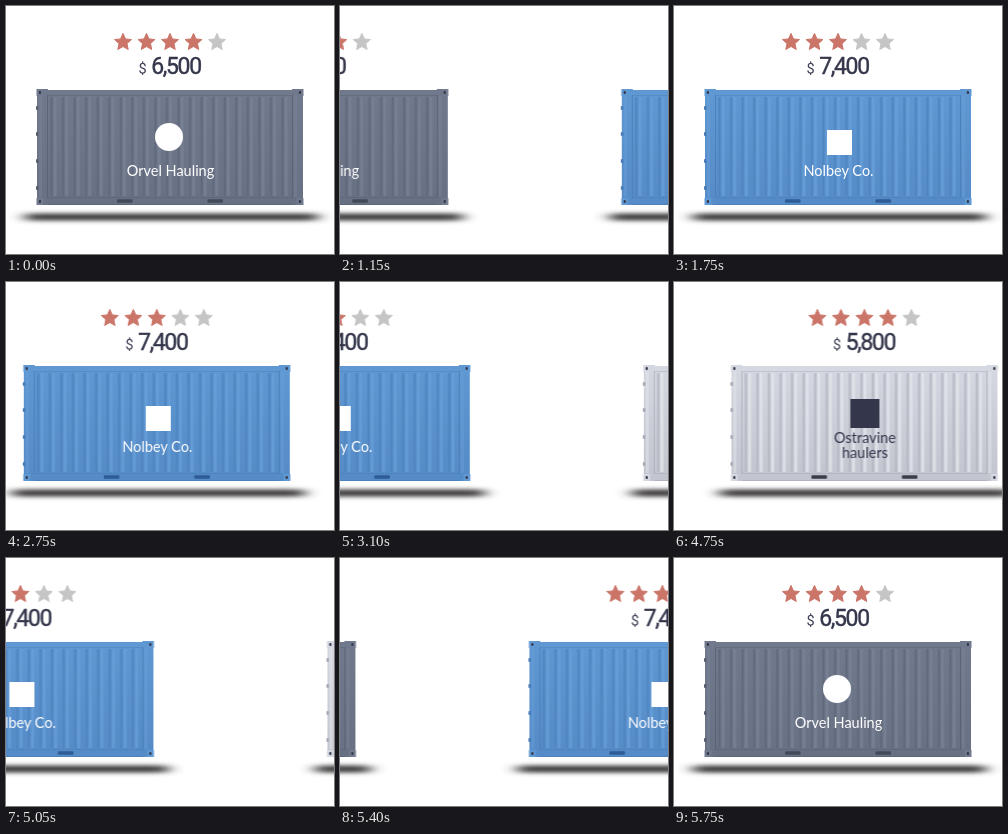
Animation, 328 px wide and 248 px high, one loop 6 s. Source, as an HTML page:

```html
<!DOCTYPE html>
<html lang="en">
<head>
<meta charset="utf-8">
<title>Container quotes</title>
<style>
  html, body { margin: 0; width: 100%; height: 100%; overflow: hidden; background: #fff; }
  svg { display: block; width: 328px; height: 248px; }
  text { text-anchor: middle; }
  .price { font: 400 23px Roboto, Arial, sans-serif; letter-spacing: -1.3px; fill: #34364b; stroke: #34364b; stroke-width: .4px; }
  .unit { font: 400 14.5px Roboto, Arial, sans-serif; fill: #3d3f54; }
  .name { font: 400 14.5px Lato, sans-serif; }
</style>
</head>
<body>
<svg viewBox="0 0 328 248">
  <defs>
    <filter id="blur" filterUnits="userSpaceOnUse" x="-20" y="194" width="370" height="36">
      <feGaussianBlur stdDeviation="8 2"/>
    </filter>
  </defs>
  <g id="track"></g>
</svg>
<script>
const LOOP = 6000, STEP = 50, GAP = 440;
// start time, scroll from, scroll to; each move is linear and lasts one second
const MOVES = [[720, 0, GAP], [2720, GAP, 2 * GAP], [4720, 2 * GAP, 0]];

const THEMES = [
  { id: 'slate', top: '#717a8d', low: '#687083', dark: '#5c6477', light: '#7a8396', edge: '#565d70', pocket: '#434959',
    ink: '#fff', stars: 4, price: '6,500', lines: ['Orvel Hauling'], base: [169.5],
    mark: '<circle cx="163" cy="131" r="14" fill="#fff"/>' },
  { id: 'blue', top: '#5f98d3', low: '#558bc7', dark: '#4b80bc', light: '#68a0da', edge: '#467bb4', pocket: '#2d5c96',
    ink: '#fff', stars: 3, price: '7,400', lines: ['Nolbey Co.'], base: [170],
    mark: '<rect x="153" y="124" width="25" height="25" fill="#fff"/>' },
  { id: 'white', top: '#d5d8e0', low: '#c2c5ce', dark: '#adb1be', light: '#e6e8ee', edge: '#a4a8b4', pocket: '#3a3d48',
    ink: '#34364b', stars: 4, price: '5,800', lines: ['Ostravine', 'haulers'], base: [161, 175.5],
    mark: '<rect x="150" y="117" width="29" height="29" fill="#34364b"/>' }
];

const rect = (x, y, w, h, fill, extra = '') =>
  `<rect x="${x}" y="${y}" width="${w}" height="${h}" fill="${fill}" ${extra}/>`;

const text = (x, y, cls, str, fill) =>
  `<text x="${x}" y="${y}" class="${cls}"${fill ? ` fill="${fill}"` : ''}>${str}</text>`;

const repeat = (n, fn) => Array.from({ length: n }, (_, i) => fn(i)).join('');

function star(cx, cy, fill) {
  const pts = Array.from({ length: 10 }, (_, i) => {
    const a = (i / 5 - .5) * Math.PI, r = i % 2 ? 4.2 : 8.9;
    return `${(cx + r * Math.cos(a)).toFixed(2)},${(cy + r * Math.sin(a)).toFixed(2)}`;
  });
  return `<polygon points="${pts.join(' ')}" fill="${fill}" stroke="${fill}" stroke-linejoin="round"/>`;
}

function gradients(t) {
  const stops = list => list.map(([o, c]) => `<stop offset="${o}" stop-color="${c}"/>`).join('');
  return `<linearGradient id="${t.id}Body" x2="0" y2="1">${stops([[0, t.top], [1, t.low]])}</linearGradient>
    <linearGradient id="${t.id}Rib">${stops([[0, t.low], [.2, t.dark], [.4, t.low], [.6, t.light], [.8, t.light], [1, t.top]])}</linearGradient>`;
}

function container(t) {
  const body = `url(#${t.id}Body)`, pitch = 11.55;
  const post = (x, shadeX) =>
    rect(x, 83, 11, 116, body) + rect(x + 2, 90, 3, 101, t.light, 'opacity=".5"') +
    rect(shadeX, 89, 1, 103, t.edge, 'opacity=".7"');
  const corner = (x, y) =>
    rect(x, y, 7, 7, t.top) + rect(x + 2.3, y + 2, 2.2, 3, '#34374a', 'rx="1"');
  const pocket = x => rect(x, 193.3, 15.5, 3.4, t.pocket, 'rx=".8"');
  return rect(31, 84, 266, 115, body) +
    repeat(21, i => rect((44 + i * pitch).toFixed(2), 91, 7, 99, `url(#${t.id}Rib)`, 'rx="1" opacity=".75"')) +
    rect(38, 84, 252, 5, t.top) +
    rect(42, 89, 244, 1, t.edge, 'opacity=".4"') +
    rect(38, 191.5, 252, 7.5, t.low) + rect(42, 191, 244, 1, t.dark, 'opacity=".6"') +
    rect(38, 198, 252, 1, t.edge, 'opacity=".6"') +
    post(31, 41) + post(286, 286) +
    [100, 126, 153, 180].map(y => rect(30, y, 2.5, 4, t.edge, 'rx="1"')).join('') +
    [30.5, 290.5].map(x => corner(x, 83) + corner(x, 192)).join('') +
    pocket(111) + pocket(201.5);
}

function slide(t, i) {
  return `<g transform="translate(${i * GAP} 0)">
    <defs>${gradients(t)}</defs>
    ${repeat(5, n => star(117 + n * 23.5, 36.3, n < t.stars ? '#cb7569' : '#c5c5c5'))}
    ${text(136.5, 67, 'unit', '$')}${text(170, 68, 'price', t.price)}
    ${rect(19, 207.5, 293, 7, '#3a3737', 'rx="3.5" filter="url(#blur)"')}
    ${container(t)}${t.mark}
    ${t.lines.map((line, n) => text(164.5, t.base[n], 'name', line, t.ink)).join('')}
  </g>`;
}

function scrollAt(ms) {
  let pos = 0;
  for (const [start, from, to] of MOVES) {
    if (ms >= start) pos = from + (to - from) * Math.min(1, (ms - start) / 1000);
  }
  return pos;
}

const track = document.getElementById('track');
track.innerHTML = THEMES.map(slide).join('');

// The carousel advances in held steps, slightly early so that step edges are safe
const frames = [];
for (let ms = 0; ms <= LOOP; ms += STEP) {
  frames.push({
    offset: ms && ms < LOOP ? (ms - 3) / LOOP : ms / LOOP,
    transform: `translateX(${-scrollAt(ms)}px)`,
    easing: 'steps(1, end)'
  });
}
track.animate(frames, { duration: LOOP, iterations: Infinity });
</script>
</body>
</html>
```
